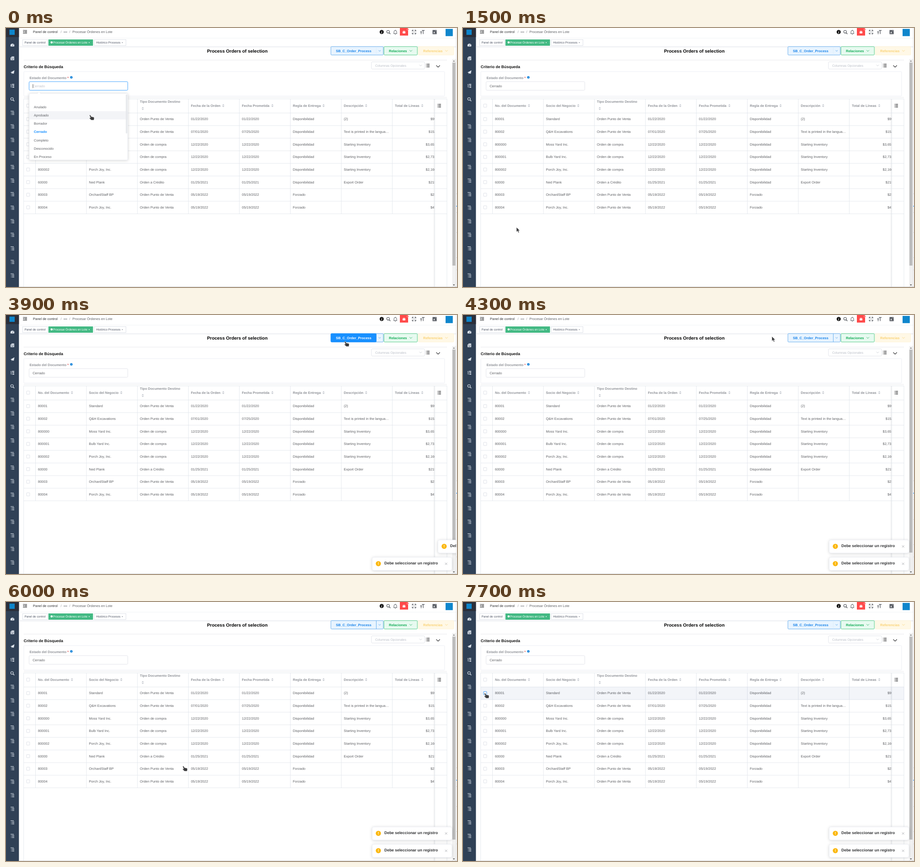
Write an HTML page that moves like this. It is 987 px wide and 568 px high and loops after 8000 ms.

```html
<!DOCTYPE html>
<html lang="es">
<head>
<meta charset="utf-8">
<title>Procesar Órdenes en Lote</title>
<style>
html, body { margin: 0; height: 100%; overflow: hidden; background: #fff; }
svg { display: block; width: 100vw; height: 100vh; font: 7.47px "Liberation Sans", Arial, sans-serif; text-rendering: geometricPrecision; }
text { white-space: pre; }
.shadow { filter: drop-shadow(0 1px 3px rgba(0, 0, 0, .16)); }
#rowHover { mix-blend-mode: multiply; }
</style>
</head>
<body>
<svg id="stage" viewBox="0 0 987 568"></svg>
<script>
const LOOP = 8000, ROW_TOP = 186.4, ROW_H = 27.64, COL_X = 64.5, COL_W = 111.56;
const GREY = '#606266', HEAD = '#909399', EDGE = '#dfe4ea', BLUE = '#1890ff', DARK = '#303133', ICON = '#4a4e55';

const text = (x, y, s, fill = GREY, extra = '') => `<text x="${x}" y="${y}" fill="${fill}" ${extra}>${s}</text>`;
const bold = (x, y, s, fill, size = 7.47, extra = '') => text(x, y, s, fill, `font-weight="700" font-size="${size}" ${extra}`);
const rect = (x, y, w, h, fill, stroke = 'none', extra = '') =>
  `<rect x="${x}" y="${y}" width="${w}" height="${h}" fill="${fill}" stroke="${stroke}" stroke-width=".8" ${extra}/>`;
const line = (d, stroke = EDGE, width = .8, extra = '') =>
  `<path d="${d}" fill="none" stroke="${stroke}" stroke-width="${width}" ${extra}/>`;
const shape = (d, fill, extra = '') => `<path d="${d}" fill="${fill}" ${extra}/>`;
const circle = (x, y, r, fill, extra = '') => `<circle cx="${x}" cy="${y}" r="${r}" fill="${fill}" ${extra}/>`;
const group = (x, y, s, extra = '') => `<g transform="translate(${x} ${y})" ${extra}>${s}</g>`;
const chevron = (x, y, color, r = 2.8, w = .8) => line(`M${x - r} ${y - r / 2}l${r} ${r}l${r} ${-r}`, color, w);
const cross = (x, y, r, color) => line(`M${x - r} ${y - r}l${2 * r} ${2 * r}m0 ${-2 * r}l${-2 * r} ${2 * r}`, color, .7);
const lens = (x, y, color) => circle(x - .8, y - .8, 2.9, 'none', `stroke="${color}" stroke-width="1.1"`) +
  line(`M${x + 1.4} ${y + 1.4}l2.8 2.8`, color, 1.4);
const listIcon = (x, y, color) => group(x, y, line('M-2-3H4M-2 0H4M-2 3H4M-4-3h1M-4 0h1M-4 3h1', color, 1.2));
const treeIcon = y => group(14, y, line('M-4-3.7H3M-1-1.2H4M-1 1.3H4M-1 3.8H4M-3-1.2h1M-3 1.3h1M-3 3.8h1', '#dde4ec', 1));
const sorter = (x, y) => shape(`M${x - 2.5} ${y - .8}l2.5-2.5 2.5 2.5zM${x - 2.5} ${y + .8}l2.5 2.5 2.5-2.5z`, '#c0c4cc');
const info = (x, y, r, color) => circle(x, y, r, color) +
  text(x, y + r * .65, 'i', '#fff', `text-anchor="middle" font-size="${r * 1.8}" font-weight="700" font-style="italic" font-family="Liberation Serif, serif"`);

function sidebar() {
  const c = '#dde4ec';
  let s = rect(0, 0, 28.3, 568, '#304156') + rect(0, 0, 28.3, 20, '#2b2f3a') + rect(7.5, 3.5, 11.5, 11.5, '#0f86cc');
  s += shape('M10 40.5A4.4 4.4 0 1 1 18 40.5z', c) + line('M14 39l1.6-3', '#304156', .9);
  s += rect(10, 64.5, 8, 6, c) + rect(12, 62.5, 6, 2, c) + line('M11.5 66.5h2M11.5 68.5h5M15 66.5h2', '#304156', .8);
  s += shape('M9.8 97.5L18.5 92.7 17 100.5 14 99.3 12.7 101.4 12.4 98.6z', c);
  s += group(14, 126.7, line('M-4-3H-2M-3-3V3.2H-1M-3 0H-1', c, .8) + line('M-1-3H4M0 0H4M0 3.2H4', c, 1.7));
  s += lens(14, 156.4, c);
  for (let i = 0; i < 13; i++) s += treeIcon(186 + 29.72 * i);
  return s;
}

function navbar() {
  let s = line('M37 5.2H46M40.5 7.4H46M40.5 9.5H46M37 11.8H46', DARK, 1) + shape('M37 8.5l2.4-1.8v3.6z', DARK);
  s += text(59, 11.4, 'Panel de control', DARK) + text(119.6, 11.4, '/', HEAD) + text(138.6, 11.4, '/', HEAD);
  s += [127.3, 130, 132.7].map(x => circle(x, 8.8, .9, ICON)).join('');
  s += text(145.3, 11.4, 'Procesar Órdenes en Lote', GREY);
  s += info(822.2, 8.8, 4.5, '#111') + lens(837, 9, ICON);
  s += line('M848 12.2H856M849 12V8.4a3 3 0 0 1 6 0V12M852 4v1.5M851 13.7h2', ICON, .9);
  s += rect(862, 0, 18, 16.6, '#ff4949') + circle(871, 9.5, 2.6, '#fff') + line('M867.5 7l7 5M867.5 12l7-5M867 9.5h8M869.5 5.5l1.5 1.5 1.5-1.5', '#fff', .7);
  s += circle(879.3, 3.2, 1.8, '#ff4949', 'stroke="#fff" stroke-width=".5"');
  s += line('M889 7.5V4.7h2.8M894.2 4.7H897V7.5M897 10.3v2.8h-2.8M891.8 13.1H889v-2.8M889.3 5l2.8 2.8M896.7 5l-2.8 2.8M896.7 12.8l-2.8-2.8M889.3 12.8l2.8-2.8', ICON, 1);
  s += line('M910 5.3H916M913 5.3V13.3M906.5 8.4h4M908.5 8.4v5', ICON, 1.2);
  s += rect(933.5, 4.5, 9, 9, '#555960') + bold(935, 11.8, 'A', '#fff', 6) + line('M939.5 6.5h2', '#fff', .7);
  s += rect(962, 2, 15.8, 15.8, '#0f86cc');
  s += line('M28.3 22.2H985', '#eef0f3');
  s += line('M28.3 41H985', '#d8dce5') + line('M28.3 42H985', '#f0f1f3', 1);
  const small = 'font-size="6.4"';
  s += rect(36.4, 25.4, 54.6, 13, '#fff', '#d8dce5') + text(40.4, 34.3, 'Panel de control', '#495060', small);
  s += rect(93.2, 25.4, 96.8, 13, '#42b983', '#42b983') + circle(99.8, 31.6, 2.3, '#fff') +
    text(103, 34.3, 'Procesar Órdenes en Lote', '#fff', small) + cross(182, 32, 1, '#fff');
  s += rect(193.2, 25.4, 69.4, 13, '#fff', '#d8dce5') + text(197.2, 34.3, 'Histórico Procesos', '#495060', small) + cross(254.6, 32, 1, '#777d88');
  return s;
}

function actions() {
  return bold(506.2, 54.4, 'Process Orders of selection', '#000', 9.99, 'text-anchor="middle"') +
    rect(711, 40.8, 114.7, 18.4, '#e8f4ff', '#4a9dea', 'rx="1.6"') +
    rect(711, 40.8, 99.2, 18.4, BLUE, BLUE, 'rx="1.6" id="pressed"') +
    line('M810.4 41V59', '#4a9dea', .8, 'id="divider"') +
    bold(722, 52.6, 'SB_C_Order_Process', '#1a84ea', 7.47, 'id="process"') + chevron(817.7, 50, '#4a9dea', 2.3) +
    rect(827.2, 40.8, 73, 18.4, '#e7faf0', '#2fbf6f', 'rx="1.6"') + bold(838, 52.6, 'Relaciones', '#14ad57') + chevron(886, 50, '#14ad57') +
    rect(902, 40.8, 78, 18.4, '#fff8e6', '#fff3d4', 'rx="1.6"') + bold(913, 52.6, 'Referencias', '#fad275') + chevron(964, 50, '#fad275');
}

function criteria() {
  return line('M38.7 70.4H965', '#e2e4e8') + bold(38.8, 88, 'Criterio de Búsqueda', '#111', 8.54) +
    rect(799.8, 74.2, 116.4, 15.8, '#fff', '#dcdfe6', 'rx="2"') + text(808, 84.7, 'Columnas Opcionales', '#b9bdc6', 'font-size="6.94"') +
    chevron(907.5, 82, '#c0c4cc', 2.6) + listIcon(923, 82.3, DARK) + chevron(945.6, 84, DARK, 4, 1.1) +
    rect(39, 95.7, 920.8, 53.6, '#fff', '#e8ebf1', 'rx="1"') + bold(51.4, 111.5, 'Estado del Documento', HEAD) +
    bold(134.2, 112, '*', '#e25555') + info(143, 108.3, 2.7, '#1080d8') +
    rect(50.5, 117.7, 216, 18.8, '#fff', '#dcdfe6', 'rx="2" id="field"') + text(58.2, 130, 'Cerrado', GREY, 'id="value"') +
    line('M58.9 123V132', '#333', .7, 'id="caret"');
}

function table() {
  const heads = [['No. del Documento', 144.4], ['Socio del Negocio', 252.3], ['Tipo Documento Destino', 299.3], ['Fecha de la Orden', 475.5],
    ['Fecha Prometida', 583], ['Regla de Entrega', 695], ['Descripción', 788.2], ['Total de Líneas', 911]];
  const pos = 'Orden Punto de Venta', buy = 'Orden de compra', stock = 'Starting Inventory', free = 'Disponibilidad';
  const winter = '12/22/2020', spring = '05/19/2022';
  const rows = [
    ['80001', 'Standard', pos, '01/22/2020', '01/22/2020', free, '(2)', '$95'],
    ['80002', 'Q&amp;H Excavations', pos, '07/01/2020', '07/25/2020', free, 'Text is printed in the langua…', '$152'],
    ['800000', 'Moss Yard Inc.', buy, winter, winter, free, stock, '$3,657'],
    ['800001', 'Bulb Yard Inc.', buy, winter, winter, free, stock, '$2,731'],
    ['800002', 'Porch Joy, Inc.', buy, winter, winter, free, stock, '$2,160'],
    ['60000', 'Ned Plank', 'Orden a Crédito', '01/25/2021', '01/25/2021', free, 'Export Order', '$215'],
    ['80003', 'OrchardStaff BP', pos, spring, spring, 'Forzado', '', '$23'],
    ['80004', 'Porch Joy, Inc.', pos, spring, spring, 'Forzado', '', '$47']];
  const bottom = ROW_TOP + ROW_H * 8;
  const box = (y, extra) => rect(44.9, y - 3.5, 7, 7, '#fff', '#d6dae2', `rx="1" ${extra}`);
  let s = line('M38.7 152.2H965', '#e2e4e8') + box(170.3, '');
  heads.forEach(([name, sx], i) => {
    const x = COL_X + COL_W * i, two = i == 2;
    s += bold(x + 5.5, two ? 164 : 173, name, HEAD) + sorter(sx, two ? 176.6 : 170.3) + line(`M${x} 155.5V${bottom}`);
  });
  rows.forEach((row, r) => {
    const y = ROW_TOP + ROW_H * (r + .5);
    s += box(y - .4, r ? '' : 'id="firstBox"');
    row.forEach((cell, c) => s += c < 7 ? text(COL_X + 5.5 + COL_W * c, y + 2.2, cell) : text(941.4, y + 2.2, cell, GREY, 'text-anchor="end"'));
  });
  s += rect(934, 155.5, 4.5, 413, 'url(#fade)') + rect(938.3, 155.5, 26.5, 413, '#fff') + listIcon(948, 170.3, DARK);
  for (let r = 0; r < 9; r++) s += line(`M38.7 ${ROW_TOP + ROW_H * r}H965`);
  return s + line('M38.7 568V155.5H965V568M938.3 155.5V568') + rect(39, 0, 926, ROW_H, '#f3f5f9', 'none', 'id="rowHover"');
}

function scrollbar() {
  return rect(976.4, 68, 8.8, 500, '#f1f1f1') + rect(977, 76, 6.6, 445, '#bcbcbc') +
    shape('M978 73.5l2.2-2.6 2.2 2.6z', '#777') + shape('M978 562.5l2.2 2.6 2.2-2.6z', '#444');
}

function dropdown() {
  const names = ['Anulado', 'Aprobado', 'Borrador', 'Cerrado', 'Completo', 'Desconocido', 'En Proceso'];
  let s = `<g class="shadow">${rect(50.7, 143.6, 215.8, 146, '#fff', '#e4e7ed', 'rx="2"')}${shape('M69 144l3.3-3.6 3.3 3.6z', '#fff')}</g>`;
  s += rect(51, 182.4, 215, 18.1, '#f3f4f7') + rect(262.2, 145.4, 3.2, 86, '#e6e8ec', 'none', 'rx="1.6"');
  names.forEach((name, i) => {
    const y = 176.1 + 18.1 * i;
    s += i == 3 ? bold(61, y, name, BLUE) : text(61, y, name);
  });
  return `<g id="dropdown">${s}</g>`;
}

const toast = id => `<g id="${id}"><g class="shadow">${rect(801.3, 0, 174.6, 28.6, '#fff', '#ebeef5', 'rx="4"')}</g>` +
  circle(814.9, 13.9, 5.6, '#fbb70c') + bold(814.9, 16.9, '!', '#fff', 8.4, 'text-anchor="middle"') +
  bold(828, 15.9, 'Debe seleccionar un registro', DARK, 8.54) + cross(963.2, 14.2, 2.4, HEAD) + '</g>';

const edge = rect(985.2, 0, 2, 568, '#fff') + line('M985.4 0V568', '#d5d7da') + line('M28 567.5H987', '#c9ccd0') +
  rect(985.5, 390, 1.5, 1.6, BLUE) + [363, 404, 448, 503, 530].map(y => rect(985.8, y, 1.2, 1, '#d0d2d5')).join('');

const pointers = shape('M0 0V10.2L2.4 8 4.2 12 6 11.2 4.2 7.4H7.4z', '#3b3b3d', 'id="arrow" stroke="#fff" stroke-width=".5"') +
  shape('M.7 1.8Q1.6-.2 3.1 1.5L4.8 4.5 9.4 5.3Q11.2 5.8 11 7.8L10.4 12H4.6L1 8.4Q.1 7 1.6 6.7L3 7.2z', '#3b3b3d', 'id="hand" stroke="#fff" stroke-width=".5"');

stage.innerHTML = '<defs><linearGradient id="fade"><stop stop-color="#000" stop-opacity="0"/><stop offset="1" stop-color="#000" stop-opacity=".06"/></linearGradient></defs>' +
  rect(0, 0, 987, 568, '#fff') + sidebar() + navbar() + actions() + criteria() + table() + scrollbar() + dropdown() +
  toast('toast1') + toast('toast2') + edge + `<g id="pointer">${pointers}</g>`;

// time, x, y
const path = [[0, 182, 190], [400, 140, 224], [600, 130, 300], [900, 68, 453], [1100, 68, 452], [1500, 117, 437], [1900, 430, 280],
  [2700, 676, 62], [3400, 740, 57], [4300, 676, 47], [4500, 735, 240], [4600, 815, 478], [4800, 832, 494], [5000, 846, 499],
  [5100, 885, 502], [5200, 921, 505], [5400, 905, 503], [5500, 883, 504], [5700, 759, 524], [6000, 386, 359], [6200, 330, 320],
  [6300, 300, 264], [6600, 150, 245], [6800, 38, 216], [7000, 38, 209], [7200, 43, 200], [7300, 46, 199]];
// time, hovered row (0 is none)
const hovers = [[0, 0], [600, 4], [700, 6], [800, 8], [900, 0], [1700, 6], [1800, 5], [1900, 4], [2100, 3], [3400, 0], [4500, 3],
  [4600, 8], [5000, 0], [6200, 7], [6300, 6], [6800, 3], [7000, 0], [7500, 1]];

const el = id => document.getElementById(id);
const set = (id, name, value) => el(id).setAttribute(name, value);
const show = (id, on) => set(id, 'visibility', on ? 'visible' : 'hidden');
const last = (keys, t) => keys.findLastIndex(k => k[0] <= t);

// The pointer glides during the first sweep, then jumps from stop to stop.
function pointerAt(t) {
  const i = last(path, t), [t0, x, y] = path[i];
  if (t0 < 600 || t0 >= 2700) return [x, y];
  const [t1, x1, y1] = path[i + 1], p = (t - t0) / (t1 - t0);
  return [x + (x1 - x) * p, y + (y1 - y) * p];
}

function placeToast(id, y, t, start) {
  show(id, t >= start);
  set(id, 'transform', `translate(${t < start + 200 ? 144 : 0} ${y})`);
}

function draw(now) {
  const t = Math.floor(now % LOOP / 100) * 100;
  const [x, y] = pointerAt(t);
  const pressed = t >= 3400 && t < 4300;
  const onRow = y > 186 && y < 407 && x > 36, hand = onRow || pressed;
  set('pointer', 'transform', `translate(${x} ${y})`);
  show('hand', hand);
  show('arrow', !hand);

  const row = hovers[last(hovers, t)][1];
  show('rowHover', row);
  set('rowHover', 'y', ROW_TOP + ROW_H * (row - 1));
  set('firstBox', 'stroke', t >= 7200 ? BLUE : '#d6dae2');

  const open = t < 400;
  show('dropdown', open);
  show('caret', open);
  set('value', 'fill', open ? '#c0c4cc' : GREY);
  set('field', 'stroke', t < 1100 ? BLUE : '#dcdfe6');

  show('pressed', pressed);
  set('process', 'fill', pressed ? '#fff' : '#1a84ea');
  set('divider', 'stroke', t >= 3400 && t < 7700 ? '#4a9dea' : '#dcecfb');
  placeToast('toast1', 531.4, t, 3400);
  placeToast('toast2', 493.4, t, 3900);
}

const begin = performance.now();
function tick() {
  draw(performance.now() - begin);
  requestAnimationFrame(tick);
}
tick();
</script>
</body>
</html>
```
